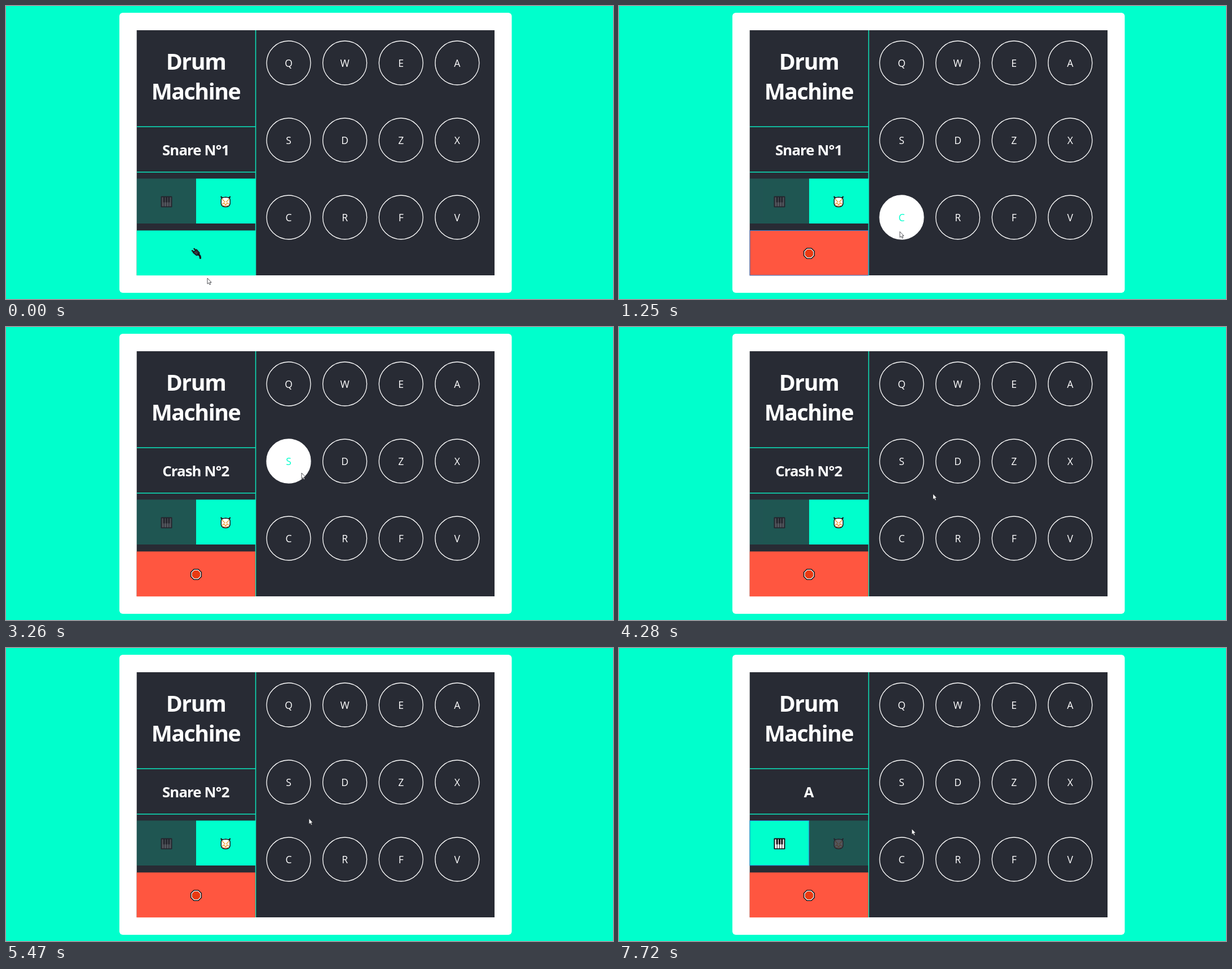
These frames come from a looping animation (1076 by 520 pixels, 8000 ms). An HTML page:

```html
<!DOCTYPE html>
<html lang="en">
<head>
<meta charset="utf-8">
<title>Drum Machine</title>
<style>
  html, body { margin: 0; width: 100%; height: 100%; overflow: hidden; background: #00ffcc; }
  svg { position: absolute; left: 0; top: 0; display: block; }
  text { font-family: "Open Sans", "Noto Sans", sans-serif; fill: #fff; text-anchor: middle; }
  .big { font-weight: 700; font-size: 39.3px; letter-spacing: -.037em; }
  .label { font-weight: 700; font-size: 25.8px; letter-spacing: -.035em; }
  .pad circle { fill: #282b34; stroke: #fff; stroke-width: 1.3; }
  .pad text { font-size: 17.5px; }
  .pad.lit circle { fill: #fff; }
  .pad.lit text { fill: #00ffcc; }
  .rule { fill: #0be8be; }
  .ring { fill: none; stroke: #2f83d8; }
</style>
</head>
<body>
<svg width="1076" height="520" viewBox="0 0 1076 520">
  <rect width="1076" height="520" fill="#00ffcc"/>
  <rect x="201" y="12" width="695.5" height="497" rx="6" fill="#fff"/>
  <rect x="231.7" y="43" width="634.3" height="435" fill="#282b34"/>
  <rect class="rule" x="232" y="213.5" width="210" height="1.5"/>
  <rect class="rule" x="232" y="294" width="210" height="1.5"/>
  <rect class="rule" x="441.8" y="43" width="1.5" height="435"/>
  <text class="big" x="336.5" y="113.3">Drum</text>
  <text class="big" x="336.5" y="165.6">Machine</text>
  <text class="label" id="label" x="336.3" y="265"></text>

  <g id="piano">
    <rect x="231.7" y="306.3" width="105.3" height="79.7" fill="#00ffcc"/>
    <g transform="translate(274.5 337.5)">
      <rect width="20" height="19.7" rx="1.2" fill="#15161a"/>
      <path d="M2 2H5.2V18H2zM6.2 2H9.6V18H6.2zM10.6 2H13.9V18H10.6zM14.9 2H18V18H14.9z" fill="#fff"/>
      <path d="M4.1 1H7.3V11H4.1zM8.5 1H11.7V11H8.5zM12.8 1H16V11H12.8z" fill="#15161a"/>
    </g>
    <rect class="ring" x="232" y="306.5" width="104.7" height="79.3"/>
  </g>

  <g id="drums">
    <rect x="337" y="306.3" width="105" height="79.7" fill="#00ffcc"/>
    <g transform="translate(380 337.5)" stroke="#17181c" stroke-width="1.5" stroke-linejoin="round">
      <path d="M1.5 1.2L4 4.5M17 1.2L14.5 4.5" stroke-width="2.4" stroke-linecap="round"/>
      <path d="M1.4 6Q2 2 9.3 1.8Q16.6 2 17.2 6V13.5Q16 19 9.3 19Q2.5 19 1.4 13.5z" fill="#fff"/>
      <path d="M3 5L8.3 10.5M15.6 5L10.3 10.5M3 14.5L6.5 11.8L9.3 16L12.1 11.8L15.6 14.5" fill="none" stroke="#f0a23c" stroke-width="1.5"/>
      <path d="M4 16.8Q9.3 18.8 14.6 16.8" fill="none" stroke="#d8641e" stroke-width="1"/>
    </g>
  </g>

  <g id="power">
    <rect id="powerBox" x="231.7" y="398.4" width="210.3" height="79.8"/>
    <g id="plug" stroke="#17181c" stroke-linecap="round" fill="none">
      <path d="M330 434.2L334 437.3M333.5 430.8L337 434.2" stroke-width="2.4"/>
      <path d="M331.5 437.5L337.8 432.2L343 438.2L341.5 442L337.5 442.5z" fill="#30323a" stroke-width="1.6" stroke-linejoin="round"/>
      <path d="M340.5 440.2Q344.6 443 344.4 447.3" stroke-width="3.4"/>
      <path d="M335.5 436.8L339 440.2" stroke="#555963" stroke-width="1"/>
    </g>
    <g id="stop" stroke-linejoin="round">
      <path d="M333 430H341L346.3 435.3V443L341 448.3H333L327.7 443V435.3z" fill="#fff" stroke="#17181c" stroke-width="1.6"/>
      <path d="M333.8 432H340.2L344.3 436V442.3L340.2 446.3H333.8L329.7 442.3V436z" fill="#e93a12"/>
    </g>
    <rect class="ring" x="232" y="398.5" width="210" height="79.5"/>
  </g>

  <g id="pads"></g>
  <path id="cursor" d="M0 0V10.2L2.3 8.2L4 11.7L5.7 10.9L4.1 7.5H7.1z" fill="#fff" stroke="#25262c" stroke-width=".8"/>
</svg>
<script>
const LOOP = 8000;
const $ = id => document.getElementById(id);

// start, end, steps, x0, y0, x1, y1
const moves = [
  [80, 320, 4, 355, 478, 346, 446],
  [790, 1410, 9, 346, 446, 526, 392],
  [1640, 1874, 4, 530, 390, 572, 372],
  [1952, 2420, 7, 574, 370, 590, 354],
  [2490, 2880, 6, 587, 350, 522, 256],
  [3260, 3720, 7, 524, 259, 553.5, 289],
  [3890, 4040, 3, 554, 290, 556.5, 296],
  [5470, 6160, 10, 537, 302.5, 316, 346],
  [6330, 6555, 4, 322, 346, 509, 322],
  [7480, 7720, 4, 511, 321.5, 519, 321]
];

const labels = [
  [0, "Snare N°1"], [1796, "Shaker"], [2802, "Crash N°2"], [4600, "Open HH"],
  [4840, "Clap"], [5160, "Snare N°2"], [6555, "C"], [6800, "F"],
  [6948, "F#"], [7096, "A#"], [7480, "A"]
];

// key, down, up
const presses = [
  ["S", 4210, 4280], ["D", 4600, 4670], ["E", 4840, 4910], ["F", 5160, 5230],
  ["Q", 6555, 6630], ["D", 6800, 6874], ["Z", 6948, 7022], ["F", 7096, 7170]
];

const POWER_ON = 490, POWER_BLUR = 1796, PIANO_ON = 6083;

const pads = [..."QWEASDZXCRFV"].map((key, i) => {
  const x = 501 + i % 4 * 99.6, y = 101 + Math.floor(i / 4) * 137;
  $("pads").insertAdjacentHTML("beforeend",
    `<g class="pad"><circle cx="${x}" cy="${y}" r="39"/><text x="${x}" y="${y + 7}">${key}</text></g>`);
  return { key, x, y, el: $("pads").lastElementChild };
});

function cursorAt(t) {
  let pos = [357, 483];
  for (const [start, end, steps, x0, y0, x1, y1] of moves) {
    if (t < start) break;
    const k = Math.min(steps - 1, Math.floor((t - start) / (end - start) * (steps - 1)));
    const p = k / (steps - 1), e = p * p * (3 - 2 * p);
    pos = [x0 + (x1 - x0) * e, y0 + (y1 - y0) * e];
  }
  return pos;
}

function setButton(id, hover, active, focus) {
  $(id).setAttribute("opacity", hover ? .5 : active ? 1 : .2);
  $(id).querySelector(".ring").style.display = focus ? "" : "none";
}

const show = (id, on) => { $(id).style.display = on ? "" : "none"; };

function draw(time) {
  const t = time + 6; // absorbs rounding of step times
  const [x, y] = cursorAt(t);
  const over = (l, top, r, b) => x >= l && x < r && y >= top && y < b;
  const on = t >= POWER_ON, keys = t >= PIANO_ON;

  $("cursor").setAttribute("transform", `translate(${x} ${y})`);
  $("label").textContent = labels.filter(([at]) => t >= at).pop()[1];

  setButton("piano", over(232, 306, 337, 386), keys, keys);
  $("drums").setAttribute("opacity", over(337, 306, 442, 386) ? .5 : keys ? .2 : 1);
  setButton("power", over(232, 398, 442, 478), true, on && t < POWER_BLUR);
  $("powerBox").setAttribute("fill", on ? "#ff5640" : "#00ffcc");
  show("stop", on);
  show("plug", !on);

  for (const pad of pads) {
    const hover = Math.hypot(x - pad.x, y - pad.y) < 39.5;
    const down = presses.some(([key, a, b]) => key === pad.key && t >= a && t < b);
    pad.el.classList.toggle("lit", hover || down);
  }
}

const origin = performance.now();
function tick() {
  draw((performance.now() - origin) % LOOP);
  requestAnimationFrame(tick);
}
tick();
</script>
</body>
</html>
```
